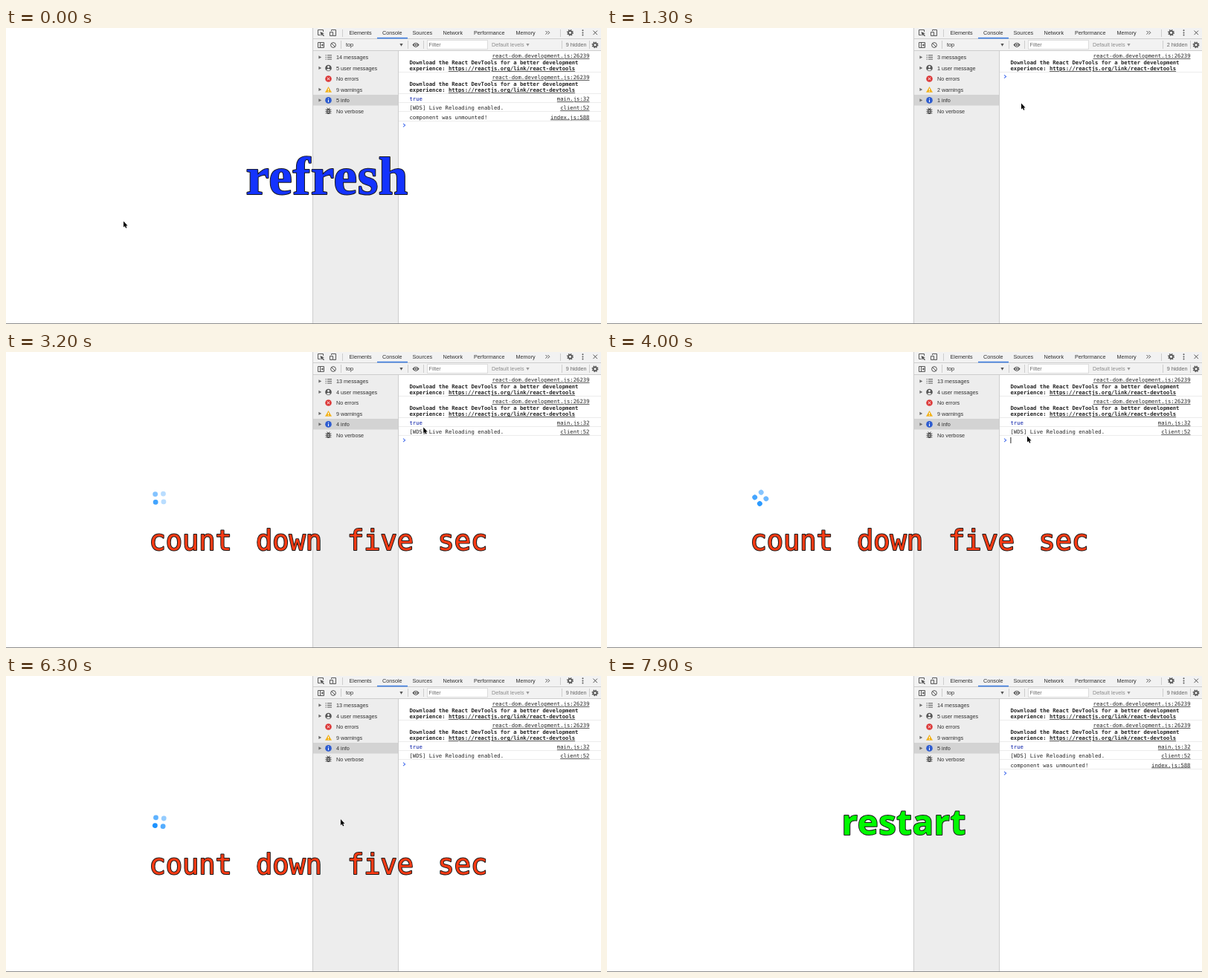
These frames come from a looping animation (800 by 399 pixels, 8 s). An HTML page:

```html
<!DOCTYPE html>
<html lang="en">
<head>
<meta charset="utf-8">
<title>Console reload</title>
<style>
html, body { margin: 0; width: 100%; height: 100%; overflow: hidden; background: #fff; }
svg { display: block; width: 800px; height: 399px; }
text { white-space: pre; }
.ui { font: 7.25px "Liberation Sans", Arial, sans-serif; fill: #303030; }
.dim { fill: #8c8c8c; }
.mono { font: 7.25px "DejaVu Sans Mono", monospace; fill: #262626; }
.bold { font-weight: bold; }
.link { text-decoration: underline; }
.end { text-anchor: end; }
.bool { fill: #0d22aa; }
.rule { stroke: #cdcdcd; stroke-width: 1; }
.row { stroke: #ececec; stroke-width: 1; }
.icon { fill: none; stroke: #565656; stroke-width: 1; }
.solid { fill: #565656; }
.caption { stroke: #1a1a1a; stroke-width: 2; stroke-linejoin: round; paint-order: stroke; }
#refresh { font: bold 71px "Liberation Serif", "Times New Roman", serif; letter-spacing: .6px; fill: #1433ff; }
#countdown { font: 37px "DejaVu Sans Mono", monospace; fill: #ff3b14; }
#restart { font: bold 47.3px "Noto Sans", "Open Sans", sans-serif; letter-spacing: .6px; fill: #00fa00; }
</style>
</head>
<body>
<svg viewBox="0 0 800 399" xmlns="http://www.w3.org/2000/svg">
  <defs>
    <g id="gear">
      <circle r="2.5" fill="none" stroke="#555" stroke-width="1.7"/>
      <circle r="3.7" fill="none" stroke="#555" stroke-width="1.5" stroke-dasharray="1.45 1.456"/>
    </g>
    <path id="down" d="M-2.1-1.8H2.1L0 2z"/>
  </defs>

  <rect width="800" height="399" fill="#fff"/>
  <g id="spinner" fill="#1890ff"></g>

  <!-- panel backgrounds -->
  <rect x="412" width="388" height="30" fill="#f2f2f2"/>
  <rect x="412" y="30" width="115" height="369" fill="#ededed"/>
  <rect x="412" y="90" width="115" height="14.5" fill="#d3d3d3"/>
  <path class="rule" d="M412 14.5H800M412 30.5H800M412.5 0V399M527.5 30V399"/>
  <path class="rule" d="M452.5 2V12M745.5 2V12M450.5 17V28M540.5 17V28M561.5 17V28M747.5 17V28M784.5 17V28"/>
  <rect x="499" y="12.8" width="41" height="1.6" fill="#3d7de0"/>

  <!-- tab bar -->
  <g id="tabs" class="ui"></g>
  <path class="icon" d="M422.5 9.5H419.5V2.5H426.5V5"/>
  <path class="solid" d="M422.5 5L427.8 7.2 425.7 8 428 10.3 427 11.2 424.7 9 423.8 11z"/>
  <path class="icon" d="M437.5 4V2.5H443.5V10.5H440M435.5 5.5H439.5V10.5H435.5z"/>
  <path class="icon" d="M725.5 4L727.8 6.3 725.5 8.6M728.5 4L730.8 6.3 728.5 8.6" stroke-width=".9"/>
  <use href="#gear" x="758.5" y="6.3"/>
  <g class="solid"><circle cx="775.5" cy="3.2" r="1"/><circle cx="775.5" cy="6.4" r="1"/><circle cx="775.5" cy="9.6" r="1"/></g>
  <path class="icon" d="M789.5 3.6L795 9.1M795 3.6L789.5 9.1"/>

  <!-- console toolbar -->
  <path class="icon" d="M419.5 19.5H427.5V26.5H419.5zM422.5 19.5V26.5"/>
  <path class="solid" d="M426.3 21V25L423.6 23z"/>
  <circle class="icon" cx="440" cy="23" r="3.4"/>
  <path class="icon" d="M437.6 20.6L442.4 25.4"/>
  <text class="ui" x="457" y="25.2">top</text>
  <use href="#down" x="531.5" y="22.8" fill="#555"/>
  <path d="M546.3 22.8Q551 16.6 555.7 22.8Q551 29 546.3 22.8z" fill="#555"/>
  <circle cx="551" cy="22.8" r="1.7" fill="#555" stroke="#f2f2f2"/>
  <rect x="566.5" y="16.5" width="81" height="12" fill="#fff" stroke="#dcdcdc"/>
  <text class="ui" x="568.5" y="25.2" style="fill:#6c6c6c">Filter</text>
  <text class="ui dim" x="653" y="25.2">Default levels</text>
  <use href="#down" x="701.5" y="22.8" fill="#999"/>
  <text id="hidden" class="ui end" style="fill:#666" x="780.5" y="25.2"></text>
  <use href="#gear" x="792" y="22.8"/>

  <!-- sidebar -->
  <g id="sidebar" class="ui"></g>
  <path class="icon" d="M432 36.8H438M432 39.4H438M432 42H438"/>
  <path class="icon" d="M429.6 36.8H430.9M429.6 39.4H430.9M429.6 42H430.9"/>
  <circle class="solid" cx="433.5" cy="54" r="4.3"/>
  <circle cx="433.5" cy="52.5" r="1.4" fill="#ededed"/>
  <path d="M430.8 56.4Q433.5 53.6 436.2 56.4Q433.5 58.6 430.8 56.4z" fill="#ededed"/>
  <circle cx="433.5" cy="68.5" r="4.3" fill="#dc3a3a"/>
  <path d="M431.8 66.8L435.2 70.2M435.2 66.8L431.8 70.2" stroke="#fff"/>
  <path d="M433.5 79L438 86.8H429z" fill="#f2b21b"/>
  <path d="M433.5 81.6V84M433.5 84.8V85.8" stroke="#fff"/>
  <circle cx="433.5" cy="97.4" r="4.3" fill="#2c5bd0"/>
  <path d="M433.5 94.8V95.8M433.5 96.7V100" stroke="#fff" stroke-width="1.1"/>
  <ellipse class="solid" cx="433.5" cy="112.4" rx="2.5" ry="3.6"/>
  <path class="icon" stroke-width=".9" d="M429.6 110H437.4M429.4 112.4H437.6M429.6 114.8H437.4M431.5 107.6L433 109M435.5 107.6L434 109"/>
  <path d="M432.4 111.5H434.6M432.4 113.5H434.6" stroke="#ededed" stroke-width=".8"/>

  <!-- console output -->
  <g id="log"></g>
  <g id="prompt">
    <path d="M534-2.2L536.6 0 534 2.2" fill="none" stroke="#4a72ee" stroke-width="1.1"/>
    <path id="caret" d="M542.9-4V4.2" stroke="#111" stroke-width=".9"/>
  </g>
  <rect y="398" width="800" height="1" fill="#8f8f8f"/>

  <path id="cursor" d="M0-.5V7.6L1.8 6 3.1 8.8 4.4 8.2 3.2 5.5H5.5z" fill="#000" stroke="#fff" stroke-width=".7" paint-order="stroke"/>

  <!-- captions -->
  <text id="refresh" class="caption" x="322.5" y="224">refresh</text>
  <g id="countdown" class="caption">
    <text x="192.5" y="266.5">count</text><text x="336" y="266.5">down</text>
    <text x="459" y="266.5">five</text><text x="580.5" y="266.5">sec</text>
  </g>
  <text id="restart" class="caption" x="315.5" y="214.3">restart</text>
</svg>
<script>
const LOOP = 8000, STEP = 100;
const $ = id => document.getElementById(id);

function add(parent, tag, attrs, text = '') {
  const el = document.createElementNS('http://www.w3.org/2000/svg', tag);
  for (const key in attrs) el.setAttribute(key, attrs[key]);
  el.textContent = text;
  parent.append(el);
  return el;
}

const tabs = { Elements: 461.5, Console: 506, Sources: 546.5, Network: 587.5, Performance: 629, Memory: 685.5 };
for (const name in tabs) add($('tabs'), 'text', { x: tabs[name], y: 9 }, name);

// Sidebar rows: label and expand arrow
const rows = [0, 1, 2, 3, 4, 5].map(i => {
  const y = 39.4 + 14.5 * i;
  return {
    arrow: add($('sidebar'), 'path', { d: `M420.4 ${y - 2.1}V${y + 2.1}L424.2 ${y}z`, fill: '#6a6a6a' }),
    label: add($('sidebar'), 'text', { x: 444, y: y + 2.6 })
  };
});

// Log entries, each shown as a prefix of this list
const devtools = { file: 'react-dom.development.js:26239', height: 29 };
const entries = [
  devtools, devtools,
  { file: 'main.js:32', text: 'true', type: 'bool' },
  { file: 'client:52', text: '[WDS] Live Reloading enabled.' },
  { file: 'index.js:588', text: 'component was unmounted!' }
];
const bottoms = [30.5];
const logs = entries.map(({ file, text, type = '', height = 12.2 }, i) => {
  const top = bottoms[i], g = add($('log'), 'g', {});
  const line = (x, y, cls, str) => add(g, 'text', { x, y: top + y, class: 'mono ' + cls }, str);
  line(784.5, 9.6, 'link end', file);
  if (text) line(542.5, 9.6, type, text);
  else {
    line(542.5, 18, 'bold', 'Download the React DevTools for a better development');
    line(542.5, 26.7, 'bold', 'experience: ');
    line(594.9, 26.7, 'bold link', 'https://reactjs.org/link/react-devtools');
  }
  bottoms.push(top + height);
  add(g, 'path', { class: 'row', d: `M528 ${Math.floor(top + height) + 0.5}H800` });
  return g;
});

const states = [
  { at: 0, logs: 5, counts: [14, 5, 0, 9, 5, 0], hidden: 9 },
  { at: 900, logs: 0, counts: [0, 0, 0, 0, 0, 0], hidden: 0 },
  { at: 1200, logs: 1, counts: [3, 1, 0, 2, 1, 0], hidden: 2 },
  { at: 1700, logs: 2, counts: [9, 2, 0, 7, 2, 0], hidden: 7 },
  { at: 2600, logs: 4, counts: [13, 4, 0, 9, 4, 0], hidden: 9 },
  { at: 7600, logs: 5, counts: [14, 5, 0, 9, 5, 0], hidden: 9 }
];
const nouns = ['message', 'user message', 'error', 'warning', 'info', 'verbose'];

function label(count, i) {
  const plural = i < 4 && count !== 1 ? 's' : '';
  return `${count || 'No'} ${nouns[i]}${plural}`;
}

// Pointer path: time, x, y
const path = [
  [0, 158, 261], [900, 557, 102], [1500, 557, 102], [1800, 556, 85], [2700, 556, 85],
  [3600, 565, 114], [4200, 565, 114], [5100, 571, 149], [6000, 571, 149],
  [6900, 104, 321], [7200, 98, 327], [7300, 98, 327], [7800, 43, 391]
];

function pointer(t) {
  const i = path.findIndex(p => p[0] >= t);
  if (i < 1) return path[0].slice(1);
  const [t0, x0, y0] = path[i - 1], [t1, x1, y1] = path[i];
  const u = (t - t0) / (t1 - t0), e = u * u * (3 - 2 * u);
  return [x0 + (x1 - x0) * e, y0 + (y1 - y0) * e];
}

// Four dots, clockwise from the top left
const dots = [[-1, -1], [1, -1], [1, 1], [-1, 1]].map(([x, y]) =>
  add($('spinner'), 'circle', { cx: x * 5.4, cy: y * 5.4, r: 3.4 }));
const SPIN_START = 2441, SPIN_RATE = 0.000977;

function spin(t) {
  const s = (t - SPIN_START) * SPIN_RATE;
  $('spinner').setAttribute('transform', `translate(206.3 196.8) rotate(${45 + 300 * s})`);
  dots.forEach((dot, i) => {
    const phase = Math.max(0, s - 0.4 * i) % 2;
    dot.setAttribute('opacity', 0.3 + 0.7 * (1 - Math.abs(1 - phase)));
  });
}

const show = (el, on) => { el.style.display = on ? '' : 'none'; };

function draw(t) {
  const state = states.filter(s => s.at <= t).pop();
  rows.forEach((row, i) => {
    row.label.textContent = label(state.counts[i], i);
    show(row.arrow, state.counts[i]);
  });
  $('hidden').textContent = state.hidden ? state.hidden + ' hidden' : '';
  logs.forEach((g, i) => show(g, i < state.logs));
  $('prompt').setAttribute('transform', `translate(0 ${bottoms[state.logs] + 6})`);
  show($('caret'), t >= 3750 && t < 7600 && (t - 3750) % 1000 < 500);

  const spinning = t >= SPIN_START && t < 7600;
  show($('spinner'), spinning);
  if (spinning) spin(t);

  show($('cursor'), t < 7900);
  if (t < 7900) $('cursor').setAttribute('transform', `translate(${pointer(t)})`);

  show($('refresh'), t < 1000);
  show($('countdown'), t >= 2200 && t < 7600);
  show($('restart'), t >= 7600);
}

function tick() {
  draw(Math.floor(performance.now() % LOOP / STEP) * STEP);
  requestAnimationFrame(tick);
}
tick();
</script>
</body>
</html>
```
